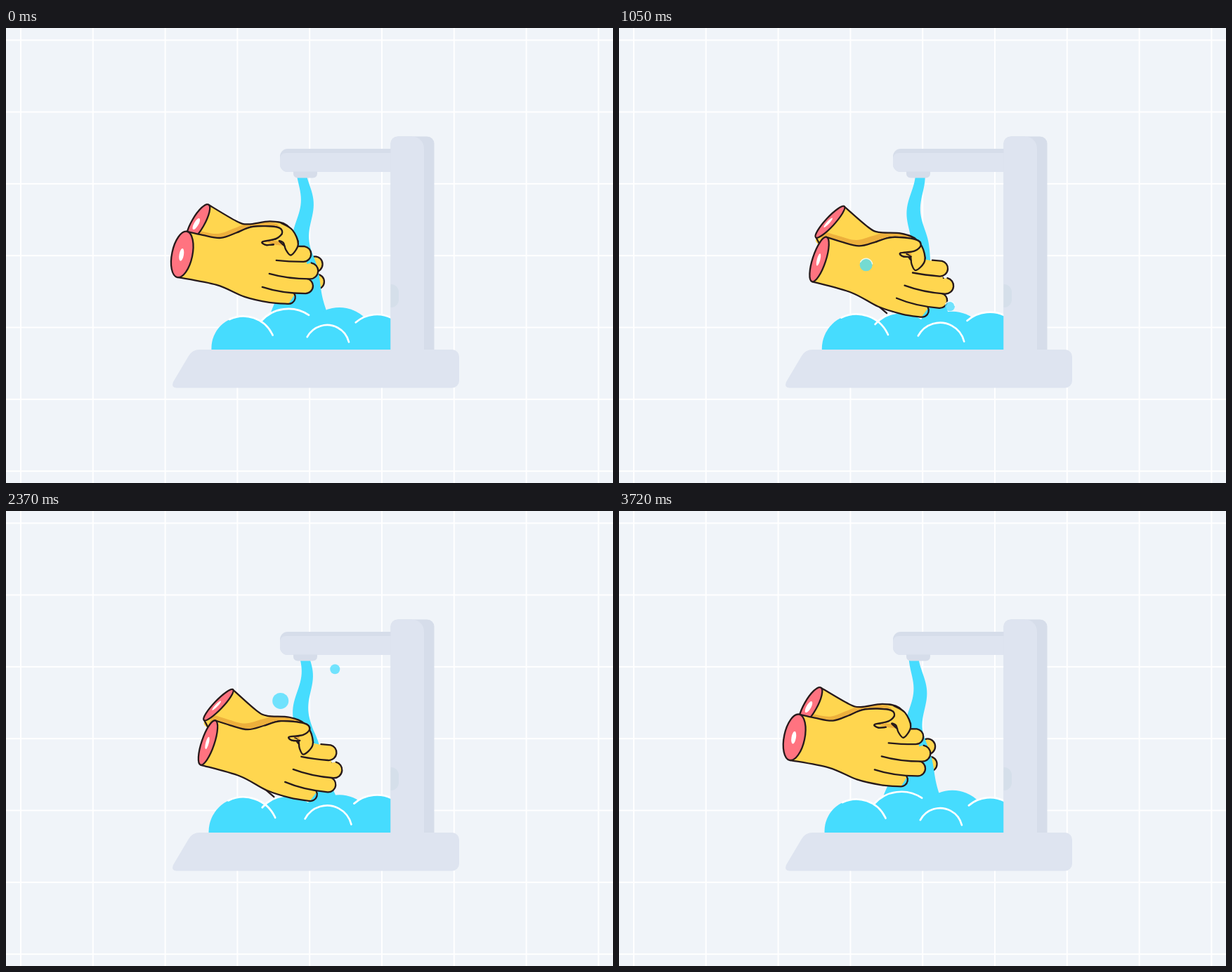
An HTML page with a canvas for the animation above (3.75 s loop, 864 px wide and 648 px high).

```html
<!DOCTYPE html>
<html lang="en">
<head>
<meta charset="utf-8">
<title>Washing hands</title>
<style>
  html, body { margin: 0; width: 100%; height: 100%; overflow: hidden; background: #f0f4f9; }
  canvas { display: block; }
</style>
</head>
<body>
<canvas id="stage" width="864" height="648"></canvas>
<script>
const ctx = document.getElementById('stage').getContext('2d');
const LOOP = 3750, STEP = 30, RUB = 1875, WAVE = 750;
const INK = '#271a1b', SKIN = '#ffd64f', SHADE = '#edb03c', FLESH = '#ff7380';
const WATER = '#46dcfe', METAL = '#dee4f0', METAL_DARK = '#d6ddea';
const TAU = 2 * Math.PI;

const lerp = (a, b, u) => a + (b - a) * u;
const clamp01 = v => Math.max(0, Math.min(1, v));
const radians = degrees => degrees * Math.PI / 180;

// Adds a smooth curve through the points, joined to whatever the path holds.
function through(path, pts) {
  path.lineTo(...pts[0]);
  for (let i = 0; i < pts.length - 1; i++) {
    const b = pts[i], c = pts[i + 1], a = pts[i - 1] || b, d = pts[i + 2] || c;
    path.bezierCurveTo(b[0] + (c[0] - a[0]) / 6, b[1] + (c[1] - a[1]) / 6,
      c[0] - (d[0] - b[0]) / 6, c[1] - (d[1] - b[1]) / 6, ...c);
  }
  return path;
}

const smooth = pts => through(new Path2D(), pts);

// A round fingertip whose lower edge runs back to the root.
function finger(x, y, r, rootX, rootY, reach = 0) {
  const path = new Path2D();
  path.moveTo(rootX, rootY);
  path.quadraticCurveTo(lerp(rootX, x, 0.45), y + r, x, y + r);
  path.arc(x, y, r, Math.PI / 2, -1.4, true);
  if (reach) path.lineTo(x - reach, y - r);
  return path;
}

// Both hands are rigid shapes, drawn here in their pulled-back position.
const wristAndThumb = [[258, 290], [280, 295], [306, 299], [330, 291], [352, 283], [385, 283.5],
  [393.5, 291], [385, 300], [365.5, 304.5], [370, 309], [381, 308.5]];
const palmEdge = [[402.5, 393], [375, 391], [340, 383], [300, 366], [244, 355]];
const front = {
  top: smooth(wristAndThumb),
  thumb: smooth(wristAndThumb.slice(3)),
  palm: smooth(wristAndThumb),
  fingers: [
    finger(426.5, 367.5, 10.7, 365, 369),
    finger(433, 346, 11.5, 375, 350),
    finger(423.5, 322, 11, 385, 331, 12)
  ],
  pinky: new Path2D()
};
[[412, 312], [428, 333], [432, 358], [412, 378]].forEach(pt => front.palm.lineTo(...pt));
through(front.palm, palmEdge);
front.pinky.arc(402.5, 383.5, 9.5, -0.6, Math.PI / 2);
through(front.pinky, palmEdge);

const arm = [[289, 252], [328, 275], [345, 279.5], [376, 275.5], [400, 281], [416, 304]];
const back = {
  top: smooth(arm),
  body: smooth([...arm, [400, 320], [330, 330], [266, 313], [258, 303]]),
  wristEdge: smooth([[258, 303], [266, 313]]),
  heel: smooth([[350, 376], [376, 391]]),
  thumb: smooth([[392, 278], [408, 288], [416, 308], [406, 323.5], [398.5, 316], [395, 306], [389, 303.5], [397, 311]])
};

const bubbles = [
  { born: 300, life: 2000, r: 9, x: 353, drift: 0, sway: 10, y: 431, rise: 279 },
  { born: 700, life: 2120, r: 7, x: 476, drift: -8, sway: 4, y: 424, rise: 236 },
  { born: 1220, life: 1850, r: 11.5, x: 365, drift: 23, sway: 12.8, y: 417, rise: 222 }
];

function fill(color, path) {
  ctx.fillStyle = color;
  path ? ctx.fill(path) : ctx.fill();
}

function ink(path) {
  ctx.strokeStyle = INK;
  ctx.lineWidth = 2.3;
  path ? ctx.stroke(path) : ctx.stroke();
}

function limb(path) {
  fill(SKIN, path);
  ink(path);
}

function box(x, y, w, h, radii, color) {
  ctx.beginPath();
  ctx.roundRect(x, y, w, h, radii);
  fill(color);
}

function ellipse(x, y, rx, ry, degrees, color) {
  ctx.beginPath();
  ctx.ellipse(x, y, rx, ry, radians(degrees), 0, TAU);
  fill(color);
}

// Moves and turns the drawing around a pivot.
function posed(x, y, dx, dy, degrees, paint) {
  ctx.save();
  ctx.translate(x + dx, y + dy);
  ctx.rotate(radians(degrees));
  ctx.translate(-x, -y);
  paint();
  ctx.restore();
}

const withFront = (p, paint) => posed(251, 322.5, 41.5 * p, 8.5 * p, 5.5 * p, paint);
const withBack = (p, paint) => posed(343, 279.5, 31 * p, 13.5 * p, 12.5 * p, paint);

// Eases out and back, with the outward stroke a little quicker.
function rub(t) {
  const phase = (t / RUB + 0.07) % 1, out = 0.46;
  const u = phase < out ? phase / out : 1 + (phase - out) / (1 - out);
  return lerp(-0.07, 1.08, (1 - Math.cos(Math.PI * u)) / 2);
}

function drawGrid() {
  ctx.fillStyle = '#f0f4f9';
  ctx.fillRect(0, 0, 864, 648);
  ctx.fillStyle = '#fff';
  for (let i = 0; i < 9; i++) ctx.fillRect(20 + i * 102.8, 0, 2, 648);
  for (let i = 0; i < 7; i++) ctx.fillRect(0, 16.3 + i * 102.3, 864, 2);
}

function drawStream(t, p) {
  const phase = t % WAVE / WAVE, length = 104;
  const crest = 248 - length * phase + 12 * Math.sin(Math.PI * phase ** 3);
  const left = [], right = [];
  for (let y = 212; y <= 430; y += 4) {
    const spread = clamp01((y - 310) / 95);
    const wave = 424 + 4.8 * Math.cos(TAU * (y - crest) / length);
    const x = lerp(wave, 417 + 14 * p, spread);
    const half = 7 + 5.5 * clamp01((y - 213) / 97) + 27.5 * spread ** 1.3;
    left.unshift([x - half, y]);
    right.push([x + half, y]);
  }
  ctx.beginPath();
  [...right, ...left].forEach(pt => ctx.lineTo(...pt));
  fill(WATER);
}

function drawFoam(p) {
  const puff = (x, y, r, dy, dr) => [x, y + dy * p, r + dr * p];
  const first = puff(338, 456, 45.6, 1, 4.4), second = puff(402, 452, 52, 3, -3);
  const third = puff(474.5, 450, 52, 5, -2), last = puff(528, 454, 46, 0, 4);
  const rim = ([x, y, r], from, to) => {
    ctx.beginPath();
    ctx.arc(x, y, r, radians(from), radians(to));
    ctx.stroke();
  };
  ctx.save();
  ctx.beginPath();
  ctx.rect(270, 380, 278, 79);
  ctx.clip();
  for (const [x, y, r] of [first, second, third, last]) ellipse(x, y, r, r, 0, WATER);
  box(340, 440, 208, 19, 0, WATER);
  ctx.strokeStyle = '#fff';
  ctx.lineWidth = 2.7;
  rim(first, -116, -24);
  rim(second, -139, -56);
  rim(last, -131, -60);
  rim(puff(457, 455, 32, 0, 4), -152, -14);
  ctx.restore();
}

function drawFaucet() {
  box(390, 172, 160, 33, [11, 0, 0, 11], METAL_DARK);
  box(390, 178, 160, 27, [8, 0, 0, 11], METAL);
  box(409, 204.5, 34, 9, [0, 0, 6, 6], METAL_DARK);
  box(547.5, 154.5, 62, 305, [10, 10, 0, 0], METAL_DARK);
  box(547.5, 154.5, 47.5, 305, [10, 17, 0, 0], METAL);
  box(547.5, 365, 11.5, 33, [0, 11, 11, 0], '#d5dfea');
  ctx.beginPath();
  ctx.moveTo(276, 458);
  ctx.arcTo(645, 458, 645, 512.5, 10);
  ctx.arcTo(645, 512.5, 240, 512.5, 10);
  ctx.lineTo(242, 512.5);
  ctx.quadraticCurveTo(235, 512, 238, 504);
  ctx.lineTo(260, 467);
  ctx.quadraticCurveTo(265, 458, 276, 458);
  fill(METAL);
}

function drawBackFingers() {
  ellipse(443, 361.5, 10, 10.5, 0, SKIN);
  ink();
  ellipse(440, 336.5, 10.7, 11, 0, SKIN);
  ink();
}

function drawBackHand(p) {
  ctx.save();
  withBack(p, () => {
    ink(back.heel);
    fill(SKIN, back.body);
  });
  drawShadow(p);
  withBack(p, () => {
    ink(back.top);
    ink(back.wristEdge);
    ellipse(273.5, 277.5, lerp(9, 6, p), 30, 30 + 3 * p, FLESH);
    ink();
    ellipse(271, 279, lerp(3.2, 1.5, p), 9, 30 + 3 * p, '#fff');
  });
  ctx.restore();
}

// The front hand's shape, shifted up, shades the back hand.
function drawShadow(p) {
  const clip = new Path2D();
  const turn = new DOMMatrix()
    .translate(343 + 31 * p, 279.5 + 13.5 * p).rotate(12.5 * p).translate(-343, -279.5);
  clip.addPath(back.body, turn);
  ctx.save();
  ctx.clip(clip);
  ctx.translate(-4, -6 - 3 * p);
  withFront(p, () => fill(SHADE, front.palm));
  ctx.restore();
}

function drawFrontHand(p) {
  withFront(p, () => {
    fill(SKIN, front.palm);
    ink(front.pinky);
    front.fingers.forEach(limb);
    ink(front.top);
  });
  withBack(p, () => limb(back.thumb));
  withFront(p, () => {
    limb(front.thumb);
    ellipse(251, 322.5, lerp(14.5, 8.3, p), 33.3, 12 + 2 * p, FLESH);
    ink();
    ellipse(250, 323, lerp(3.2, 2.1, p), 9, 10, '#fff');
  });
}

function drawBubble({ born, life, r, x, drift, sway, y, rise }, t) {
  const u = (t - born) / life;
  if (u < 0 || u > 1) return;
  const cx = x + drift * u + sway * Math.sin(1.4 * TAU * (u - 0.39));
  const cy = y - rise * (u - 0.35 * Math.sin(TAU * u) / TAU);
  ctx.save();
  ctx.globalAlpha = 0.75 * clamp01((1 - u) / 0.15);
  ellipse(cx, cy, r, r, 0, WATER);
  ctx.globalAlpha = 0.8 * clamp01((u - 0.1) / 0.05) * clamp01((0.42 - u) / 0.04);
  ctx.strokeStyle = '#fff';
  ctx.lineWidth = 1.5;
  ctx.beginPath();
  ctx.arc(cx, cy, r, radians(-153), radians(-9));
  ctx.stroke();
  ctx.restore();
}

function draw(now) {
  const t = Math.floor(now % LOOP / STEP) * STEP;
  const p = rub(t);
  ctx.lineCap = ctx.lineJoin = 'round';
  drawGrid();
  withBack(p, drawBackFingers);
  drawStream(t, p);
  drawFoam(p);
  drawFaucet();
  drawBackHand(p);
  drawFrontHand(p);
  bubbles.forEach(bubble => drawBubble(bubble, t));
}

const begin = performance.now();
function tick() {
  draw(performance.now() - begin);
  requestAnimationFrame(tick);
}
tick();
</script>
</body>
</html>
```
